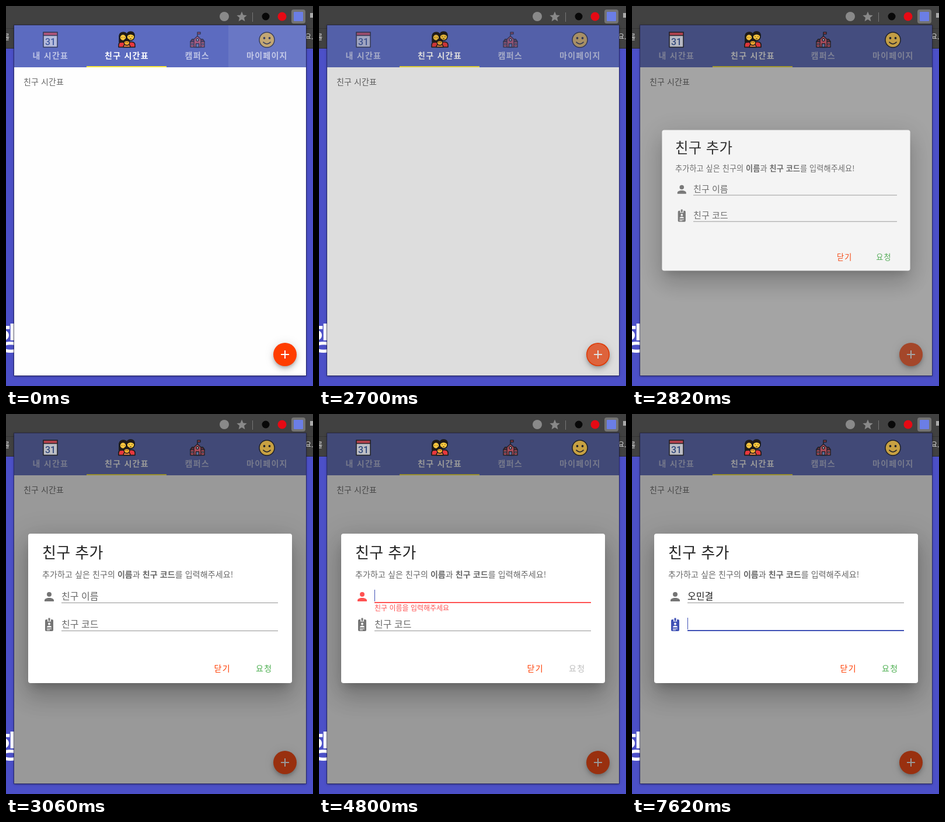
Write an HTML page that moves like this. It is 526x651 px and loops after 8 s.

```html
<!DOCTYPE html>
<html lang="ko">
<head>
<meta charset="utf-8">
<title>친구 추가</title>
<style>
html, body { margin: 0; width: 100%; height: 100%; overflow: hidden; background: #4c50c8; }
body { position: relative; font-family: "Noto Sans CJK KR", "Noto Sans KR", "Noto Sans CJK", "Noto Sans CJK JP", sans-serif; }
svg, .layer { position: absolute; left: 0; top: 0; width: 526px; height: 651px; }
.frame { position: absolute; left: 14px; top: 33px; width: 500px; height: 600px;
  box-shadow: 0 0 0 1px rgba(25,25,70,.55), 0 1px 4px rgba(0,0,0,.5); }
.popup { clip-path: inset(33px 12px 18px 14px); background: #fefefe; }
.shade { background: #212121; }
.fab { position: absolute; left: 458px; top: 577px; width: 40px; height: 40px; border-radius: 50%; background: #ff3d00;
  box-shadow: 0 3px 5px -1px rgba(0,0,0,.2), 0 6px 10px rgba(0,0,0,.14), 0 1px 18px rgba(0,0,0,.12); }
.dialog { transform-origin: 264px 333px; }
.card { position: absolute; left: 38px; top: 205px; width: 452px; height: 256px; border-radius: 4px; background: #fff;
  box-shadow: 0 11px 15px -7px rgba(0,0,0,.2), 0 24px 38px 3px rgba(0,0,0,.14), 0 9px 46px 8px rgba(0,0,0,.12); }
.tab { font-size: 14px; font-weight: 700; letter-spacing: 1.25px; fill: #fff; }
.dim { opacity: .6; }
.body { font-size: 14px; letter-spacing: .1px; fill: #666; }
.field { font-size: 16px; }
.button { font-size: 14px; font-weight: 500; letter-spacing: 1.25px; }
</style>
</head>
<body>
<svg viewBox="0 0 526 651">
  <rect width="526" height="73" fill="#414141"/>
  <path d="M0 38.5H526" stroke="#353535"/>
  <path d="M0 72.5H526" stroke="#2c2c34"/>
  <circle cx="374" cy="18" r="8" fill="#898989"/>
  <path d="M404 9.5l2.5 5.9 6.2.5-4.7 4.1 1.4 6.2-5.4-3.3-5.4 3.3 1.4-6.2-4.7-4.1 6.2-.5z" fill="#898989"/>
  <path d="M422.500 11V27" stroke="#777"/>
  <circle cx="445" cy="18" r="6.500" fill="#080808"/>
  <circle cx="473" cy="18" r="7.500" fill="#e60a14"/>
  <rect x="489" y="6" width="24" height="24" rx="4" fill="#737373"/>
  <rect x="493" y="10" width="16" height="16" rx="1" fill="#6b7ee6"/>
  <rect x="521" y="12" width="8" height="8" fill="#aaa"/>
  <g font-size="12" fill="#e0e0e0"><text x="-5" y="58">를</text><text x="512" y="57">요...</text></g>
  <text x="-20" y="589" font-size="54" font-weight="700" fill="#fff">행</text>
</svg>
<div class="frame"></div>

<div class="layer popup">
  <svg viewBox="0 0 526 651">
    <rect x="14" y="33" width="500" height="72" fill="#5c6bc0"/>
    <rect id="hover" x="381" y="33" width="133" height="72" fill="#fff" opacity=".08"/>
    <rect x="138" y="103" width="137" height="2" fill="#ffeb3b"/>
    <g class="tab">
      <text class="dim" x="45.500" y="90">내 시간표</text>
      <text x="169" y="90">친구 시간표</text>
      <text class="dim" x="306.500" y="90">캠퍼스</text>
      <text class="dim" x="412" y="90">마이페이지</text>
    </g>
    <g id="icons" stroke="#1c1c1c" stroke-width="1.500" stroke-linejoin="round">
      <g class="dim">
        <rect x="64" y="45" width="24" height="25.500" fill="#f0f0f0"/>
        <path d="M64 45h24v5.500h-24z" fill="#e8484c"/>
        <text x="76" y="66.500" text-anchor="middle" font-family="Roboto, sans-serif" font-size="16" font-weight="500" fill="#34518c" stroke="none">31</text>
      </g>
      <g>
        <path d="M193 70.500v-4q0-5 7-5t7 5v4z" fill="#e8383d"/>
        <path d="M207 70.500v-4q0-5 7-5t7 5v4z" fill="#e8383d"/>
        <path d="M194 62V51q1-6 7-6t6 6v11z" fill="#241a16"/>
        <circle cx="200.500" cy="54" r="5.500" fill="#ffc83d"/>
        <circle cx="213.500" cy="52.500" r="6.500" fill="#ffc83d"/>
        <path d="M207 51q0-7 6.500-7t6.500 7q-3-3-6.500-3t-6.500 3z" fill="#241a16"/>
        <path d="M201 70.500q0-5 6-5t6 5z" fill="#f7894a"/>
        <circle cx="207" cy="62.500" r="4.800" fill="#ffb02e"/>
        <path d="M202.500 61q0-4.500 4.500-4.500t4.500 4.500q-4.500-3-9 0z" fill="#241a16"/>
        <path d="M198.500 53.500v1M202.500 53.500v1M211 52v1M216 52v1M205.500 62v1M208.500 62v1M212 56h3" stroke-width="1.200"/>
      </g>
      <g class="dim">
        <path d="M328 52v-7h5v3h-5" fill="#e8383d"/>
        <path d="M316 70.500V61l3-4h18l3 4v9.500z" fill="#d9535a"/>
        <path d="M316 61l3-4h18l3 4z" fill="#7a2730"/>
        <path d="M322 70.500V57l6-5.500 6 5.500v13.500z" fill="#d9535a"/>
        <circle cx="328" cy="58" r="2" fill="#e8eef8"/>
        <path d="M325.500 70.500v-6h5v6z" fill="#6d87bd"/>
        <path d="M318 64h2v3h-2zM336 64h2v3h-2z" fill="#a9c6ee" stroke-width="1"/>
      </g>
      <g class="dim">
        <circle cx="447" cy="58" r="13" fill="#ffc83d"/>
        <path d="M440.500 61.500q6.500 7 13 0" fill="none"/>
        <g fill="#1c1c1c" stroke="none"><circle cx="442.500" cy="55" r="1.900"/><circle cx="451.500" cy="55" r="1.900"/></g>
      </g>
    </g>
    <text class="body" x="30" y="135">친구 시간표</text>
  </svg>
  <div class="fab"></div>
  <svg viewBox="0 0 526 651">
    <circle id="glow" cx="478" cy="597" r="20" fill="#fff" opacity=".04"/>
    <circle id="ripple" cx="478" cy="597" fill="#fff"/>
    <path d="M471 597h14M478 590v14" stroke="#fff" stroke-width="2"/>
  </svg>
  <div class="layer shade" id="shade"></div>
  <svg viewBox="0 0 526 651"><use href="#icons" id="lit"/></svg>

  <div class="layer dialog" id="dialog">
    <div class="card"></div>
    <svg viewBox="0 0 526 651">
      <text x="62" y="247" font-size="26" font-weight="300" letter-spacing=".35" fill="#212121">친구 추가</text>
      <text class="body" x="62" y="280">추가하고 싶은 친구의 <tspan font-weight="700">이름</tspan>과 <tspan font-weight="700">친구 코드</tspan>를 입력해주세요!</text>

      <path id="iconA" transform="translate(62 301)" d="M12 4a4 4 0 0 1 0 8 4 4 0 0 1 0-8M12 14c4.420 0 8 1.790 8 4v2H4v-2c0-2.210 3.580-4 8-4z"/>
      <g id="iconB">
        <rect x="67" y="352" width="14" height="20" rx="2"/>
        <path d="M71 351.500h6v4h-6z" fill="#fff"/>
        <path d="M72.500 349.500h3v5h-3z"/>
        <g fill="#fff"><circle cx="74" cy="359.500" r="2"/><path d="M70 365.500q0-2.800 4-2.800t4 2.800zM70 367.500h8v1h-8zM70 369.500h5v1h-5z"/></g>
      </g>
      <path d="M95 323.500H466M95 371.500H466" stroke="#949494"/>
      <rect id="lineA" y="322" height="2"/>
      <rect id="lineB" y="370" height="2"/>
      <g class="field">
        <text id="labelA" x="95" y="318">친구 이름</text>
        <text id="labelB" x="95" y="366">친구 코드</text>
        <text id="value" x="95" y="318" fill="#212121"></text>
      </g>
      <text id="message" x="95" y="337" font-size="12" fill="#ff5252">친구 이름을 입력해주세요</text>
      <rect id="caret" width="1" height="20" fill="#3f51b5"/>
      <g class="button">
        <text x="356.500" y="441" fill="#ff3d00">닫기</text>
        <text id="send" x="428" y="441">요청</text>
      </g>
    </svg>
  </div>
</div>

<script>
const LOOP = 8000, STEP = 60;
const OPEN = 2700, FOCUS_A = 3300, FOCUS_B = 7020, CLEARED = 4320, RETYPED = 5100;
const GREY = [117, 117, 117], LABEL = [102, 102, 102], INDIGO = [63, 81, 181];
const RED = [255, 82, 82], GREEN = [76, 175, 80], OFF = [189, 189, 189];
const TYPING = [
  [0, ''], [3840, 'ㅇ'], [CLEARED, ''], [RETYPED, 'ㅇ'], [5340, '오'], [5580, '오ㅁ'], [5760, '오미'],
  [6060, '오민'], [6180, '오민ㄱ'], [6240, '오민겨'], [6360, '오민결']
];
const el = {};
document.querySelectorAll('[id]').forEach(n => el[n.id] = n);

const clamp = v => Math.min(1, Math.max(0, v));
const mix = (a, b, k) => a.map((v, i) => v + (b[i] - v) * k);
const rgb = c => `rgb(${c.map(Math.round).join(',')})`;
const set = (name, attrs) => {
  for (const key in attrs) el[name].setAttribute(key, attrs[key]);
};

// cubic-bezier(.25, .8, x2, 1)
function ease(p, x2) {
  p = clamp(p);
  let lo = 0, hi = 1, s = .5;
  const at = (a, b) => 3 * (1 - s) * (1 - s) * s * a + 3 * (1 - s) * s * s * b + s * s * s;
  for (let i = 0; i < 20; i++) {
    s = (lo + hi) / 2;
    if (at(.25, x2) < p) lo = s; else hi = s;
  }
  return p === 0 || p === 1 ? p : at(.8, 1);
}
const since = (t, start, x2 = .5) => ease((t - start) / 300, x2);

function drawField(id, focus, error, empty) {
  const accent = mix(INDIGO, RED, error);
  const half = 185.5 * focus;
  set('icon' + id, { fill: rgb(mix(GREY, accent, focus)) });
  set('line' + id, { x: 280.5 - half, width: 2 * half, fill: rgb(accent) });
  set('label' + id, { opacity: empty ? 1 - focus : 0, fill: rgb(mix(LABEL, INDIGO, focus)) });
}

function draw(t) {
  const opened = since(t, OPEN, .25);
  const error = since(t, CLEARED) - since(t, RETYPED);
  const focusB = since(t, FOCUS_B);
  const focusA = since(t, FOCUS_A) - focusB;
  const text = TYPING.filter(s => s[0] <= t).pop()[1];

  set('hover', { opacity: t < 2520 ? .08 : 0 });
  set('glow', { opacity: t >= 2520 && t < OPEN ? .04 : 0 });
  set('ripple', {
    r: 20 * clamp((t - 2580) / 130),
    opacity: .25 * (1 - clamp((t - 2760) / 240))
  });
  el.shade.style.opacity = .46 * since(t, 2666);
  set('lit', { opacity: opened });
  el.dialog.style.opacity = opened;
  el.dialog.style.transform = `scale(${.5 + opened / 2})`;

  drawField('A', focusA, error, t < 3840);
  drawField('B', focusB, 0, true);
  el.value.textContent = text;
  set('message', { opacity: error, y: 333 + 4 * error });
  set('send', { fill: rgb(mix(GREEN, OFF, error)) });
  const second = t >= FOCUS_B;
  set('caret', {
    x: second ? 95 : 95 + Math.round(text.length * 14.72),
    y: second ? 349 : 301,
    opacity: t >= FOCUS_A ? 1 : 0
  });
}

const begin = performance.now();
function tick() {
  const t = (performance.now() - begin) % LOOP;
  draw(Math.floor(t / STEP) * STEP);
  requestAnimationFrame(tick);
}
tick();
</script>
</body>
</html>
```
